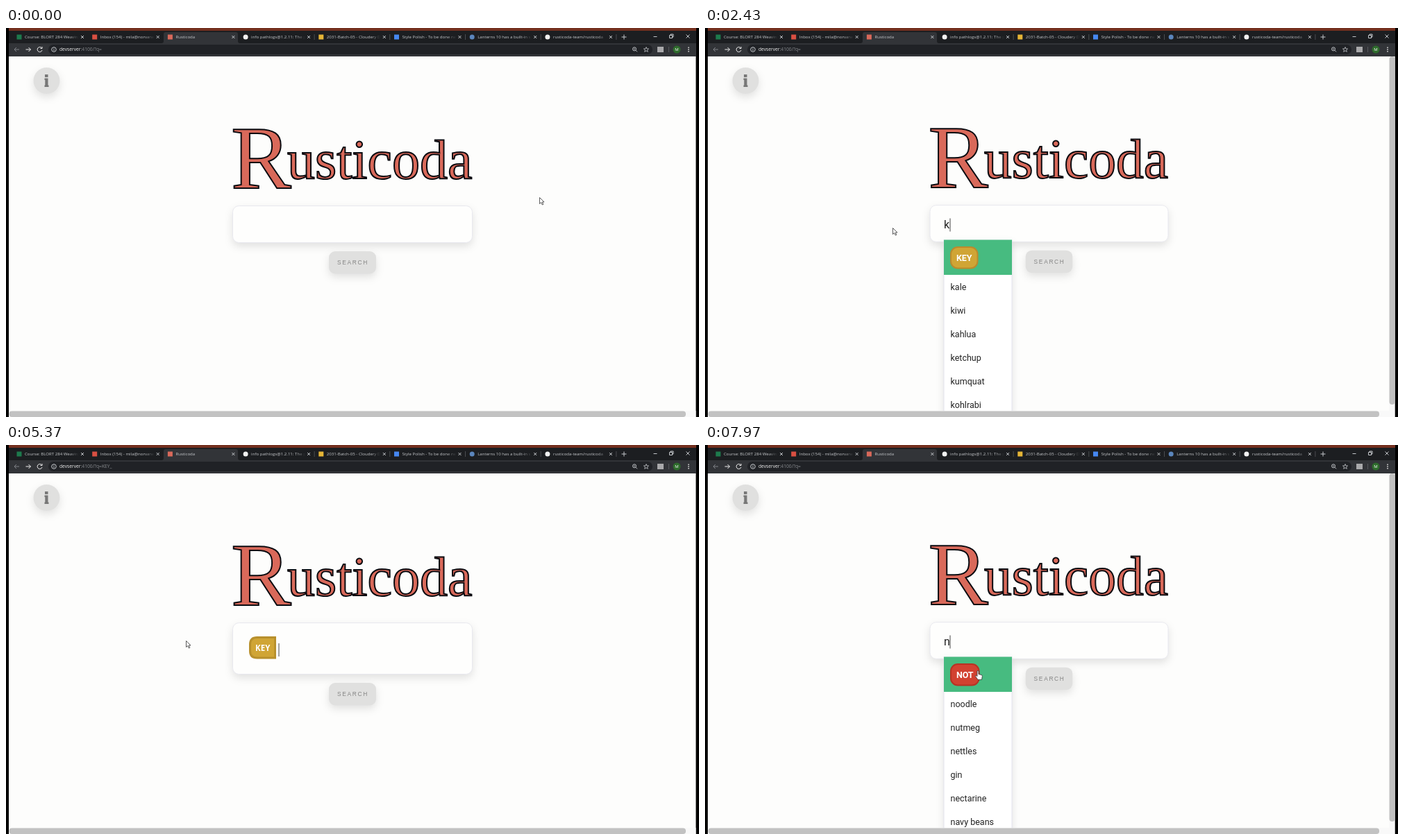
An HTML page that plays this animation: 998 by 561 pixels, repeating every 8 s.

```html
<!DOCTYPE html>
<html lang="en">
<head>
<meta charset="utf-8">
<title>Rusticoda</title>
<style>
  html, body { margin: 0; width: 100%; height: 100%; overflow: hidden; background: #000; }
  svg { display: block; }
  #stage { width: 100vw; height: 100vh; }
  text { white-space: pre; }
  .ui { font-family: "Open Sans", sans-serif; }
  .body { font-family: Roboto, sans-serif; fill: #222; }
  .brand { font: 80px "Liberation Serif", serif; fill: #d9695a; stroke: #0b0b10; stroke-width: 2; }
  .brand .initial { font-size: 130px; }
  .chip { font-weight: 700; fill: #fff; text-anchor: middle; }
  .soft { filter: drop-shadow(0 5px 6px rgba(0, 0, 0, .11)); }
  .line { fill: none; stroke: #c4c7cb; stroke-width: 1; }
</style>
</head>
<body>
<svg id="stage" viewBox="0 0 998 561" preserveAspectRatio="none">
  <defs>
    <linearGradient id="fade"><stop stop-color="#1c1e21" stop-opacity="0"/><stop offset="1" stop-color="#1c1e21"/></linearGradient>
  </defs>
  <rect width="998" height="561"/>

  <!-- Browser frame -->
  <rect x="4" width="990" height="4" fill="#74301f"/>
  <rect x="4" y="4" width="990" height="19" fill="#1c1e21"/>
  <rect x="4" y="22" width="990" height="19" fill="#323438"/>
  <path d="M224 22q3 0 3-3v-10q0-3 3-3h101q3 0 3 3v10q0 3 3 3z" fill="#323438"/>
  <g id="tabs" class="ui" font-size="6.1" fill="#c6c8cb"></g>
  <g class="line">
    <path d="M886.500 13h7m-3.500-3.500v7M932.500 12.500h5M955.500 10.500h4v4h-4zM957 10.500v-1.500h4v4h-1.500M979.500 9.500l5 5m0-5l-5 5"/>
    <path d="M19 31h-7m3-3l-3 3l3 3" stroke="#808388"/>
    <path d="M28.500 31h7m-3-3l3 3l-3 3" stroke="#eee"/>
    <path d="M51.500 29a3.500 3.500 0 1 0 .5 3M52 27v2.500h-2.500" stroke="#eee"/>
  </g>
  <rect x="61" y="24" width="870" height="14" rx="7" fill="#202226"/>
  <g class="line">
    <circle cx="69" cy="31" r="3.300"/><path d="M69 30.500v2.300M69 28.800v.8"/>
    <circle cx="905" cy="30.300" r="2.500"/><path d="M907 32.300l2 2M904 30.300h2"/>
    <path d="M922 27.500l1 2.500h2.600l-2 1.700l.7 2.600l-2.300-1.500l-2.300 1.500l.7-2.600l-2-1.700h2.600z" stroke-width=".8"/>
    <path d="M954.500 27v8" stroke="#55585c"/>
  </g>
  <rect x="938" y="27" width="9" height="8" fill="#a9a9ab"/>
  <circle cx="966" cy="31" r="5.500" fill="#2e6b2c"/>
  <text class="ui" x="966" y="33.300" font-size="6" fill="#fff" text-anchor="middle">M</text>
  <path d="M983 27.500v7" stroke="#ddd" stroke-width="1.600" stroke-dasharray="1.500 1.250"/>
  <text class="ui" x="77" y="33.400" font-size="6.700" fill="#f1f1f1">devserver<tspan id="url" fill="#8b8e92"></tspan></text>

  <!-- Page -->
  <rect x="4" y="41" width="989.500" height="520" fill="#fdfdfc"/>
  <circle class="soft" cx="58.500" cy="76" r="19" fill="#e0e0df"/>
  <path d="M56 67h4.500v4H56zM55.500 72.500h5v10h1v2.500h-6v-2.500h.8v-7.500h-.8z" fill="#777"/>

  <g id="content">
    <text class="brand"><tspan class="initial" x="324" y="230.500">R</tspan><tspan x="405" y="216.500">usticoda</tspan></text>
    <g class="soft">
      <rect id="field" x="326.500" y="256.500" width="345" height="53" rx="9" fill="#fefefd" stroke="#e8e8ee"/>
    </g>
    <g id="search">
      <rect class="soft" x="465" y="322" width="68" height="32.500" rx="9" fill="#e0e0df"/>
      <text x="477" y="341.300" font-size="8.400" letter-spacing="1.700" fill="#858585" font-family="Liberation Sans, Arial, sans-serif">SEARCH</text>
    </g>
  </g>

  <g id="tag">
    <path d="M387.500 277.500v29.500h-26q-10 0-10-10v-9.500q0-10 10-10z" fill="#d0a535" stroke="#b8902c" stroke-width="3"/>
    <text class="ui chip" x="369.700" y="297" font-size="11.500">KEY</text>
  </g>
  <text id="typed" class="body" x="344" y="289" font-size="16"></text>
  <rect id="caret" width="1" height="19" fill="#444"/>

  <g id="list">
    <rect class="soft" x="344" y="306" width="98" height="256" fill="#fff" stroke="#e4e4ee"/>
    <rect x="344" y="305.500" width="98" height="50.500" fill="#47bb80"/>
    <rect id="option" x="354" y="316" height="30.500" rx="10" stroke-width="2"/>
    <text id="optionText" class="body chip" y="336" font-size="12.500" style="fill:#fff"></text>
    <g id="items" class="body" font-size="12.500"></g>
  </g>

  <g fill="#c2c2c2">
    <rect x="4" y="552" width="989.500" height="9" fill="#f9f9f9"/>
    <rect id="scrollX" x="4.500" y="552.500" height="8.500" rx="4"/>
    <g id="scrollY">
      <rect x="985" y="41" width="8.500" height="511" fill="#f9f9f9"/>
      <rect x="985.500" y="41" width="8" height="502" rx="4"/>
    </g>
  </g>

  <g id="pointer" fill="#fff" stroke="#333" stroke-width=".8">
    <path id="arrow" d="M.5 .5v9l2.200-2l1.600 3.500l1.500-.7l-1.600-3.300h2.800z"/>
    <path id="hand" d="M-1 1q1-1.500 2 0v4.500l4 1q1.500.5 1.300 2l-.8 5h-5.500l-3.500-5q-.5-1.500 1-1l1.500 1z"/>
    <path id="beam" d="M-2 -6h4m-2 0v12m-2 0h4"/>
  </g>
</svg>
<script>
const DURATION = 8000, BLINK = 530;
const $ = id => document.getElementById(id);
const show = (id, on) => $(id).setAttribute('visibility', on ? 'visible' : 'hidden');
const set = (id, attrs) => {
  for (const name in attrs) $(id).setAttribute(name, attrs[name]);
};

const TABS = [
  ['Course: BLORT 284 Weaving', '#1d7a4d', 0],
  ['Inbox (154) - mila@norvane', '#d94f42', 0],
  ['Rusticoda', '#d9695a', 0],
  ['info pathlogs@1.2.11: The p', '#f1f1f1', 1],
  ['2031-Batch-05 - Cloudery D', '#e5b536', 0],
  ['Style Polish - To be done ne', '#4688f1', 0],
  ['Lanterns 10 has a built-in s', '#5b86bd', 1],
  ['rusticoda-team/rusticoda', '#f1f1f1', 1],
];
$('tabs').innerHTML = TABS.map(([title, color, round], i) => {
  const x = 9 + 108.7 * i, active = i === 2;
  return `<rect x="${x + 6.5}" y="9.5" width="7" height="7" rx="${round ? 3.5 : 0}" fill="${color}"/>
    <svg x="${x + 18}" y="4" width="78" height="18"><text y="11.2">${title}</text></svg>
    ${active ? '' : `<rect x="${x + 82}" y="7" width="14" height="13" fill="url(#fade)"/>`}
    <path class="line" d="M${x + 99} 11l4 4m0-4l-4 4"/>
    ${i > 2 ? `<path class="line" d="M${x + 109} 9v8" style="stroke:#4a4d51"/>` : ''}`;
}).join('');

const MENUS = {
  k: { label: 'KEY', width: 38.5, fill: '#d0a535', stroke: '#bb8a2c',
       items: ['kale', 'kiwi', 'kahlua', 'ketchup', 'kumquat', 'kohlrabi'] },
  n: { label: 'NOT', width: 40.5, fill: '#d24231', stroke: '#b73324',
       items: ['noodle', 'nutmeg', 'nettles', 'gin', 'nectarine', 'navy beans'] },
};

// Each state restarts the caret blink: start, typed text, tag shown, caret present
const STATES = [
  [0, '', false, false],
  [1570, '', false, true],
  [2400, 'k', false, true],
  [4310, '', true, true],
  [5630, '', false, true],
  [6470, 'n', false, true],
];

// Pointer stops: time, x, y
const PATH = [
  [30, 768, 244], [830, 480, 284], [1270, 360, 283], [1570, 360, 283], [1670, 312, 274],
  [2370, 270, 288], [2970, 270, 288], [3230, 336, 299], [3730, 374, 322], [4310, 374, 322],
  [5300, 259, 282], [6000, 259, 282], [6230, 263, 282], [7000, 263, 282],
  [7800, 361, 313], [7970, 393, 325],
];

function pointerAt(t) {
  const next = PATH.findIndex(p => p[0] > t);
  if (next === 0) return PATH[0].slice(1);
  if (next < 0) return PATH[PATH.length - 1].slice(1);
  const [t0, x0, y0] = PATH[next - 1], [t1, x1, y1] = PATH[next];
  const u = (t - t0) / (t1 - t0), ease = u * u * (3 - 2 * u);
  return [x0 + (x1 - x0) * ease, y0 + (y1 - y0) * ease];
}

function drawMenu(letter) {
  const { label, width, fill, stroke, items } = MENUS[letter];
  set('option', { width, fill, stroke });
  set('optionText', { x: 354 + width / 2 });
  $('optionText').textContent = label;
  $('items').innerHTML = items
    .map((item, i) => `<text x="353.5" y="${378 + 34 * i}">${item}</text>`).join('');
}

let current;
function drawState(state) {
  if (state === current) return;
  current = state;
  const [, typed, tagged] = state, open = typed !== '';
  $('typed').textContent = typed;
  if (open) drawMenu(typed);
  ['list', 'scrollY'].forEach(id => show(id, open));
  show('tag', tagged);
  set('content', { transform: open ? 'matrix(.9942 0 0 .9942 -.6 .6)' : '' });
  set('field', { height: tagged ? 74 : 53 });
  set('search', { transform: `translate(0 ${tagged ? 21 : 0})` });
  set('scrollX', { width: open ? 966.5 : 974.5 });
  set('caret', { x: tagged ? 392.5 : open ? 352.5 : 346.5, y: tagged ? 286 : 274.5 });
}

function draw(t) {
  const state = STATES.filter(s => s[0] <= t).pop();
  const [start, typed, , focused] = state;
  drawState(state);
  show('caret', focused && Math.floor((t - start) / BLINK) % 2 === 0);

  const picked = t >= 4030 && t < 5630;
  $('url').textContent = ':4100/?q=' + (picked ? 'KEY_' : '');

  const [x, y] = pointerAt(t);
  const overText = !typed && x > 340 && x < 660 && y > 262 && y < 300;
  const overOption = typed && !picked && x > 344 && y > 306;
  const shape = overText ? 'beam' : overOption ? 'hand' : 'arrow';
  ['arrow', 'hand', 'beam'].forEach(id => show(id, id === shape));
  set('pointer', { transform: `translate(${x} ${y})` });
}

function frame() {
  draw(performance.now() % DURATION);
  requestAnimationFrame(frame);
}
frame();
</script>
</body>
</html>
```
